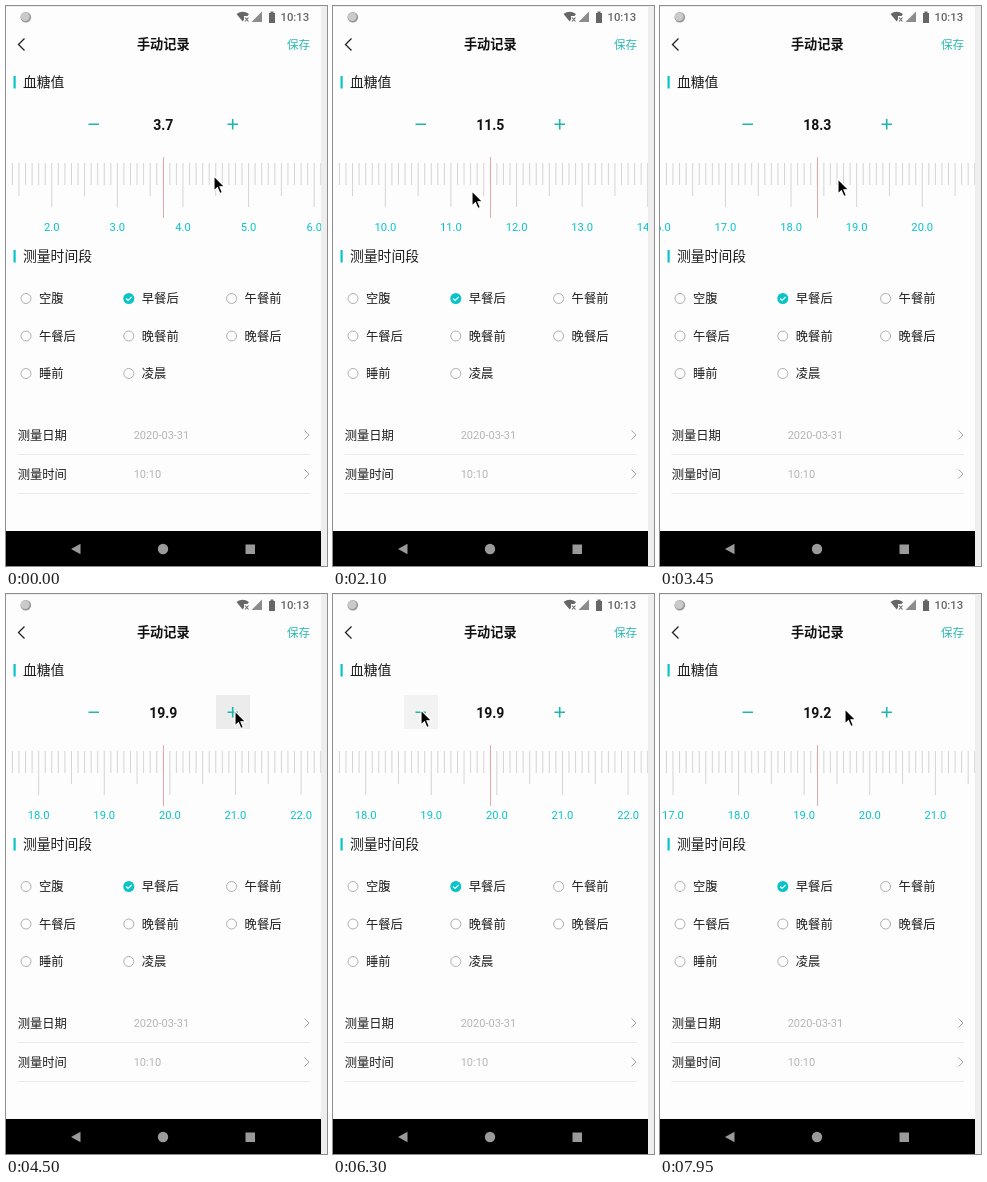
Animation of 321 by 560 pixels, one loop 8 s. Source, as an HTML page:

```html
<!DOCTYPE html>
<html lang="zh-CN">
<head>
<meta charset="utf-8">
<title>手动记录</title>
<style>
html, body { margin: 0; width: 100%; height: 100%; overflow: hidden; background: #fdfdfd; }
svg { display: block; width: 100%; height: 100%; }
text { font-family: Roboto, "Noto Sans CJK SC", "Noto Sans CJK", sans-serif; fill: #1c1c1c; }
.mid { text-anchor: middle; }
</style>
</head>
<body>
<svg viewBox="0 0 321 560" xmlns="http://www.w3.org/2000/svg">
  <defs><clipPath id="page"><rect width="315" height="560"/></clipPath></defs>
  <rect width="321" height="560" fill="#fdfdfd"/>
  <rect x="315" width="6" height="560" fill="#eee"/>
  <rect width="315" height="1" fill="#ececec"/>

  <g fill="#666">
    <circle cx="19.8" cy="11.2" r="5.3" fill="#969696"/>
    <circle cx="19.2" cy="10.6" r="4.4" fill="#cacaca"/>
    <path d="M230.500 8Q236.500 3.500 243 8L241.500 10H238V13.500L236.700 15.500Z"/>
    <path d="M239 11.500l3.500 4m0-4l-3.500 4" stroke="#666" stroke-width="1.100"/>
    <path d="M245.500 16L256 5.500V16Z" fill="#8c8c8c"/>
    <path d="M263 7h1.500V5.500h3V7H269V17H263Z"/>
  </g>

  <path d="M18.500 32.500L12.500 38.500L18.500 44.500" fill="none" stroke="#222" stroke-width="1.300"/>
  <g id="content"></g>
  <g id="press">
    <rect id="pad" y="101" width="34" height="34"/>
    <circle id="ripple" cx="231.500" cy="117.500" r="12" fill="#dfdfdf"/>
  </g>
  <path d="M82.500 118.200H93M221.500 118.200H232M226.700 113V123.500" stroke="#1db5ae" stroke-width="1.600"/>
  <text id="value" class="mid" x="157.300" y="123.500" font-size="14" font-weight="700" style="fill:#111"></text>
  <g clip-path="url(#page)">
    <path id="ticks" stroke="#c9c9c9" stroke-width="0.800"/>
    <g id="labels"></g>
  </g>
  <path d="M157.500 151V212" stroke="#e3a9a9"/>

  <rect y="525" width="315" height="35"/>
  <g fill="#9a9a9a">
    <path d="M65 543L74.500 537.700V548.300Z"/>
    <circle cx="157" cy="543" r="5.200"/>
    <rect x="239.500" y="538.500" width="9.500" height="9.500"/>
  </g>
  <path id="cursor" d="M0 0V15L3.400 11.800L5.900 17.500L8.300 16.400L5.900 10.800H10.700Z" stroke="#fff" stroke-width="1.100"/>
</svg>
<script>
const $ = id => document.getElementById(id);
const STEP = 150, LOOP = 8000, MID = 157.3, GAP = 6.56;
const TEAL = '#08c4c8';

function add(parent, tag, attrs, text) {
  const el = document.createElementNS('http://www.w3.org/2000/svg', tag);
  for (const k in attrs) el.setAttribute(k, attrs[k]);
  if (text) el.textContent = text;
  parent.appendChild(el);
  return el;
}

const content = $('content');
const write = (s, x, y, size, color = '#1c1c1c', more = {}) =>
  add(content, 'text', { x, y, 'font-size': size, style: 'fill:' + color, ...more }, s);
const line = (d, stroke, width = 0.9) =>
  add(content, 'path', { d, fill: 'none', stroke, 'stroke-width': width });

function heading(s, y) {
  add(content, 'rect', { x: 7.5, y: y - 6, width: 2.2, height: 12.5, fill: TEAL });
  write(s, 17, y + 5.2, 13.8);
}

function option(s, i) {
  const x = 20 + i % 3 * 102.8, y = 292.5 + Math.floor(i / 3) * 37.5;
  const on = i === 1;
  add(content, 'circle', {
    cx: x, cy: y, r: on ? 5.5 : 5, fill: on ? TEAL : 'none',
    stroke: on ? 'none' : '#a6a6a6', 'stroke-width': 0.9
  });
  if (on) line(`M${x - 2.7} ${y}l2 2l3.6 -3.7`, '#fff', 1.2);
  write(s, x + 13, y + 4.5, 12.3);
}

function field(s, value, y) {
  write(s, 11.7, y + 4.5, 12.3);
  write(value, 127.7, y + 3.7, 11, '#b5b5b5');
  line(`M298.5 ${y - 4.5}l4.5 4.5l-4.5 4.5`, '#999');
  line(`M11.5 ${y + 19.5}H304`, '#ebebeb', 1);
}

function buildPage() {
  write('10:13', 274.5, 15.2, 11.3, '#666', { 'font-weight': 500 });
  write('手动记录', MID, 43.2, 13.2, '#111', { class: 'mid', 'font-weight': 700 });
  write('保存', 281, 42.6, 11.6, '#2bb9b2');
  heading('血糖值', 76);
  heading('测量时间段', 250);
  '空腹 早餐后 午餐前 午餐后 晚餐前 晚餐后 睡前 凌晨'.split(' ').forEach(option);
  field('测量日期', '2020-03-31', 429);
  field('测量时间', '10:10', 468);
}

const clamp = (v, lo, hi) => Math.min(hi, Math.max(lo, v));
const between = (s, a, b) => s >= a && s <= b;

// Points are [step, ...values], joined linearly.
function along(points, s) {
  const i = clamp(points.findIndex(p => p[0] >= s), 1, points.length - 1);
  const [t0, ...a] = points[i - 1], [t1, ...b] = points[i];
  return a.map((v, n) => v + (b[n] - v) * (s - t0) / (t1 - t0));
}

const swipes = [[0, 37], [9, 92], [14, 116], [23, 184], [28, 199]];
const pointer = [[0, 208, 170], [4, 118, 180], [9, 220, 186], [14, 139, 185], [19, 215, 178],
  [23, 178, 173], [28, 229, 117], [36, 229, 117], [39, 88, 116], [49, 88, 116], [53, 185, 115]];

// Ruler position in tenths: swipes, then three taps up, three down, and a held minus.
function rulerAt(s) {
  const up = clamp(Math.floor((s - 29) / 2), 0, 3);
  const down = clamp(s - 39, 0, 3) + clamp(s - 43, 0, 7);
  return Math.round(along(swipes, Math.min(s, 28))[0]) + up - down;
}

const labels = Array.from({ length: 6 }, () =>
  add($('labels'), 'text', { class: 'mid', y: 225, 'font-size': 11.2, style: 'fill:' + TEAL }));

function drawRuler(pos) {
  let d = '';
  for (let n = pos - 23; n <= pos + 24; n++) {
    const end = n % 10 === 0 ? 201 : n % 5 === 0 ? 190 : 179;
    d += `M${(MID + (n - pos) * GAP).toFixed(2)} 157V${end}`;
  }
  $('ticks').setAttribute('d', d);
  const first = Math.ceil((pos - 27) / 10);
  labels.forEach((el, i) => {
    const n = first + i;
    el.setAttribute('x', MID + (n * 10 - pos) * GAP);
    el.textContent = n.toFixed(1);
  });
}

function drawPress(s) {
  const plus = between(s, 30, 35), minus = between(s, 39, 42);
  $('press').setAttribute('visibility', plus || minus ? 'visible' : 'hidden');
  $('pad').setAttribute('x', plus ? 210 : 71);
  $('pad').setAttribute('fill', plus ? '#ececec' : '#f2f2f2');
  $('ripple').setAttribute('opacity', plus ? s % 2 : 0);
}

function draw(time) {
  const s = Math.floor(time % LOOP / STEP);
  const pos = rulerAt(s);
  drawRuler(pos);
  drawPress(s);
  // The readout trails the ruler by one tick during swipes.
  const lag = between(s, 1, 27) ? 1 : 0;
  $('value').textContent = ((pos - lag) / 10).toFixed(1);
  $('cursor').setAttribute('transform', `translate(${along(pointer, s)})`);
}

buildPage();
const start = performance.now();
function tick() {
  draw(performance.now() - start);
  requestAnimationFrame(tick);
}
tick();
</script>
</body>
</html>
```
